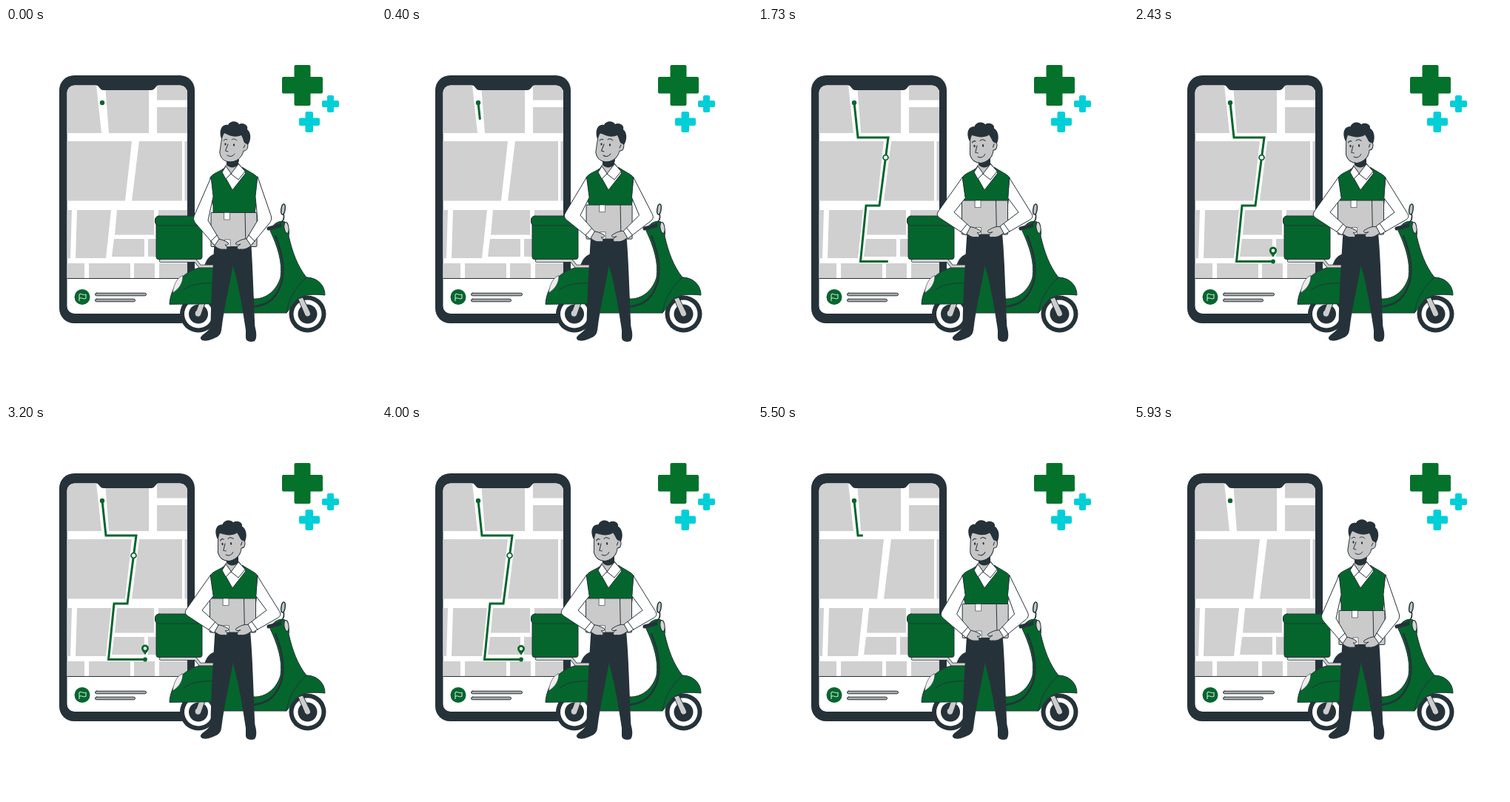
An HTML page for the animation above (6.01 s loop, 500 by 500 pixels).

```html
<!DOCTYPE html>
<html lang="en">
<head>
<meta charset="utf-8">
<title>Delivery</title>
<style>
  html, body { margin: 0; width: 100%; height: 100%; overflow: hidden; background: #fff; }
  svg { display: block; width: 100vw; height: 100vh; }
  .g { fill: #04662d; }
  .d { fill: #263239; }
  .s { fill: #c6c6c6; }
  .w { fill: #fff; }
  .line { stroke: #263239; stroke-width: 1; stroke-linejoin: round; stroke-linecap: round; }
  .none { fill: none; }
</style>
</head>
<body>
<svg viewBox="0 0 500 500">
  <defs>
    <clipPath id="screen"><rect x="82.5" y="77.500" width="162.500" height="308.500" rx="10"/></clipPath>
    <g id="wheel">
      <circle class="d" r="25"/>
      <circle class="w" r="19"/>
      <circle class="d" r="13"/>
    </g>
  </defs>

  <!-- pluses -->
  <g fill="#04722a">
    <rect x="389.500" y="50" width="22" height="55" rx="2"/>
    <rect x="373" y="66" width="55" height="22.500" rx="2"/>
  </g>
  <g fill="#00cfd8">
    <rect x="434" y="91" width="9" height="23" rx="2"/>
    <rect x="427" y="98" width="23" height="9" rx="2"/>
    <rect x="404.500" y="113" width="10.500" height="28" rx="2"/>
    <rect x="396" y="121.500" width="28" height="10.500" rx="2"/>
  </g>

  <!-- phone -->
  <rect class="d" x="72" y="64" width="183" height="335" rx="20"/>
  <g clip-path="url(#screen)">
    <rect class="w" x="82" y="77" width="164" height="310"/>
    <g fill="#d0d0d0" id="blocks"></g>
    <path class="line none" d="M82 338.500H246"/>
  </g>
  <path class="d" d="M121 77C126 77 126 84 132 84H196C202 84 202 77 207 77Z"/>
  <circle class="g" cx="103" cy="363.500" r="10.500"/>
  <path class="none" stroke="#e4efe8" d="M99 369V360C102 358 104 362 108 360V365.500C104 367 102 363.500 99 365.500"/>
  <g class="line" fill="#aaa" stroke-width=".8">
    <rect x="120.500" y="358.200" width="69" height="3.600" rx="1.800"/>
    <rect x="120.500" y="366.200" width="54" height="3.600" rx="1.800"/>
  </g>

  <!-- route -->
  <path id="route" class="none" stroke="#04662d" stroke-width="3" d="M130 101L135 148H176L164 240H146L138.500 315.500H188"/>
  <circle class="g" cx="130" cy="101" r="3.200"/>
  <circle id="stop" class="w" cx="172.500" cy="175" r="3.400" stroke="#04662d" stroke-width="1.800"/>
  <circle id="goal" class="g" cx="188" cy="315.500" r="2.900"/>
  <g id="pin">
    <path class="g" d="M0 0C-2-4-5-6-5-9A5 5 0 0 1 5-9C5-6 2-4 0 0Z"/>
    <circle class="w" cy="-9" r="2.200"/>
  </g>

  <!-- scooter -->
  <g class="line" stroke="#173a2a">
    <path class="d" d="M268 323C272 309 278 305 290 305H304V323Z"/>
    <use href="#wheel" x="260" y="386.500" stroke="none"/>
    <use href="#wheel" x="407.500" y="386.500" stroke="none"/>
    <path fill="#ccc" d="M262 370L269 372L264 386A4.500 4.500 0 1 1 257 382Z"/>
    <path class="g" d="M221 373C222 352 238 325 272 322L312 322C326 326 332 344 334 366C352 367 366 354 371 337C374 317 367 295 357 274C360 265 369 259 377 262C382 268 383 276 382 281C387 303 394 322 406 337C420 337 431 347 431 361C420 360 407 359 398 364C389 368 386 378 379 385H284C283 380 281 376 278 373Z"/>
    <path class="none" stroke="#263239" stroke-width="2.500" d="M364 281C377 312 380 345 360 366C353 373 344 376 332 377"/>
    <path class="none" d="M240 354C250 346 265 344 282 345M379 385C382 366 390 352 406 337"/>
    <path fill="#ccc" d="M395 366L401 364L411 384A4 4 0 0 1 404 388Z"/>
    <path fill="#eee" stroke-width=".6" d="M225 358C227 345 232 337 239 334.500C239 344 235 352 225 358Z"/>
    <path class="none" stroke="#263239" stroke-width="4.500" d="M209 314.500H256L262 322H284"/>
    <path class="none" stroke="#d2d2d2" stroke-width="3" d="M209 314.500H256L262 322H284"/>
    <rect class="g" x="203" y="262" width="62" height="50.500" rx="3"/>
    <rect class="g" x="201.500" y="254" width="64.500" height="13" rx="5"/>
    <path class="none" stroke="#263239" stroke-width="5" d="M355 271L370 267"/>
    <path class="none" stroke="#263239" stroke-width="1.600" d="M375 251C377 258 374 261 370 265"/>
    <ellipse fill="#bcc8c0" stroke-width="1.500" cx="374.500" cy="245" rx="2.600" ry="7" transform="rotate(8 374.500 245)"/>
    <ellipse fill="#d5d5d5" cx="379" cy="270" rx="3" ry="7.500" transform="rotate(-8 379 270)"/>
  </g>

  <!-- man -->
  <path class="d" d="M277 403L291 407C291 416 285 418 277 421C270 424 262 423 263 418C266 413 272 412 277 403ZM324 405L336 403C339 411 339 420 336 423C331 425 324 424 324 418Z"/>
  <path class="d" d="M283 268H329C333 300 334 350 336.500 406L324 408C320 380 313 340 306.500 321C303 345 295 375 291 409L276.500 406C277 360 280 315 283 268Z"/>
  <path class="g line" d="M294 190C287 195 280 196 276 202C275 215 277 230 280 240V252H336C337 240 341 220 340 202C336 197 328 194 319 188L306 208Z"/>
  <path class="w line" d="M297 186L292 194L306 219L324 196L314 183Z"/>
  <path class="s" d="M298 172L314 170V188L304 199L298 190Z"/>
  <path class="d" d="M298 177L314 172V185C308 190 302 189 298 185Z"/>
  <path class="w line" d="M297 187L292 195L297 204L304 197ZM314 184L304 197L314 205L323 194Z"/>

  <g id="head">
    <path class="s line" d="M293 142C291 152 290 160 288.800 168C290 176 294 180 302 181C312 181 319 175 321 166C327 167 329 156 324 154L320 142Z"/>
    <path class="d" d="M291 150C287 138 292 129 300 131C303 125 312 125 315 130C321 127 328 132 326 137C332 142 331 152 327 158L324 156C321 156 321 150 318 145C309 149 301 145 295 142Z"/>
    <path class="d" d="M298 180C304 182 311 180 315 177C315 183 312 187 308 187C302 187 299 184 298 180Z"/>
    <path class="line none" d="M294 152C296 150 298 150 299 151M305 151C307 149 310 150 312 152M300 157L296.500 166L300 167M299 172C303 175 307 173 309 170M323 158L321 162"/>
    <g id="eyes" class="d"><ellipse cx="296.500" cy="157" rx="1.100" ry="1.800"/><ellipse cx="308" cy="158" rx="1.100" ry="1.800"/></g>
  </g>

  <g id="parcel" class="line">
    <rect fill="#cacaca" x="277" y="249.500" width="62" height="46" rx="1"/>
    <path class="none" d="M323 249.500L324 295.500"/>
    <path class="w" stroke-width=".6" d="M295 249.500H302.500V259H295ZM296 286H303V295.500H296Z"/>
  </g>
  <g class="line">
    <g id="hands" class="s">
      <path d="M284 285C290 285 295 287 300 290C302 293 299 294 296 293C301 297 299 300 295 299C289 300 284 297 280 292Z"/>
      <path d="M328 285C321 284 316 287 311 290C309 293 313 294 317 292C310 296 312 300 317 299C324 300 330 296 334 291Z"/>
    </g>
    <path id="armL" class="w"/>
    <path id="armR" class="w"/>
    <path id="cuffs" class="none"/>
  </g>
</svg>

<script>
const LOOP = 6010;
const $ = id => document.getElementById(id);

$('blocks').innerHTML = [
  'M82 77H122L129 142H82Z', 'M134 77H193V142H139Z',
  'M204 77H246V97.500H204Z', 'M204 107H246V142H204Z',
  'M82 153H170L161 233.500H82Z', 'M180 153H238V233.500H170Z', 'M241.500 153H246V233.500H241.500Z',
  'M82 246H89L87 311H82Z', 'M96 246H142L135 311H94Z',
  'M150 246H200V279.500H147Z', 'M206 246H246V279.500H206Z',
  'M146 285H187V309H143Z', 'M192 285H246V309H192Z',
  'M82 318H106V338H82Z', 'M112 318H168V338H112Z',
  'M173 318H201V338H173Z', 'M207 318H246V338H207Z'
].map(d => `<path d="${d}"/>`).join('');

// shoulder, outer elbow, outer cuff, inner cuff, inner elbow, armpit
const arms = {
  armL: {
    low: [[277, 202], [252, 259], [282, 294], [288, 285], [273, 260], [280, 228]],
    high: [[276, 202], [240, 253], [281, 280], [287, 269], [265, 249], [280, 230]]
  },
  armR: {
    low: [[340, 201], [360, 259], [331, 294], [325, 285], [340, 260], [337, 228]],
    high: [[340, 203], [373, 256], [333, 279], [327, 268], [352, 249], [338, 230]]
  }
};

const clamp = u => Math.max(0, Math.min(1, u));
const span = (t, a, b) => clamp((t - a) / (b - a));
const ease = u => u < .5 ? 2 * u * u : 1 - 2 * (1 - u) ** 2;
const backOut = u => 1 + 2.7 * (u - 1) ** 3 + 1.7 * (u - 1) ** 2;
const inOut = (t, a, b, c, d) => ease(span(t, a, b)) - ease(span(t, c, d));
const mix = (a, b, p) => a + (b - a) * p;
const at = (p, q, u) => p.map((v, i) => mix(v, q[i], u));

function armPath([a, b, c, d, e, f]) {
  return `M${a}L${at(a, b, .9)}Q${b} ${at(b, c, .14)}L${c}L${d}L${e}L${f}Z`;
}

function drawArms(lift) {
  let bands = '';
  for (const id in arms) {
    const { low, high } = arms[id];
    const pts = low.map((p, i) => at(p, high[i], lift));
    $(id).setAttribute('d', armPath(pts));
    bands += `M${at(pts[2], pts[1], .17)}L${at(pts[3], pts[4], .2)}`;
  }
  $('cuffs').setAttribute('d', bands);
}

function scaleAt(id, x, y, s) {
  $(id).setAttribute('transform', `translate(${x} ${y}) scale(${s}) translate(${-x} ${-y})`);
}

function draw(t) {
  const lift = inOut(t, 30, 680, 5200, 5830);
  const nod = inOut(t, 380, 1000, 5380, 5830);
  const route = inOut(t, 30, 2000, 4440, 5930);

  drawArms(lift);
  $('parcel').setAttribute('transform', `translate(${-1.5 * lift} ${-16.5 * lift})`);
  $('hands').setAttribute('transform', `translate(0 ${-16.5 * lift})`);
  $('head').setAttribute('transform', `translate(0 ${nod}) rotate(${-8 * nod} 305 186)`);

  const blink = 1 - .9 * Math.sin(Math.PI * span(t, 1480, 1660));
  $('eyes').setAttribute('transform', `translate(0 157.5) scale(1 ${blink}) translate(0 -157.5)`);

  const path = $('route');
  const len = path.getTotalLength();
  path.setAttribute('stroke-dasharray', `${route * len} ${len * 2}`);
  path.style.visibility = route > 0 ? 'visible' : 'hidden';
  scaleAt('stop', 172.5, 175, span(route, .34, .38));

  scaleAt('goal', 188, 315.5, span(t, 1930, 2100) - span(t, 4400, 4570));
  const pop = t < 4000 ? backOut(span(t, 2050, 2500)) : 1 - ease(span(t, 4050, 4450));
  const bob = t > 2500 && t < 4000 ? 1.2 * Math.sin((t - 2500) / 1500 * Math.PI * 4) : 0;
  $('pin').setAttribute('transform', `translate(188 ${310 + bob}) scale(${Math.max(0, pop)})`);
}

// steps alternate between 30 and 70 ms
function step(t) {
  const base = t - t % 100;
  return Math.min(5930, t % 100 < 30 ? base : base + 30);
}

const start = performance.now();
function tick() {
  draw(step((performance.now() - start) % LOOP));
  requestAnimationFrame(tick);
}
tick();
</script>
</body>
</html>
```
